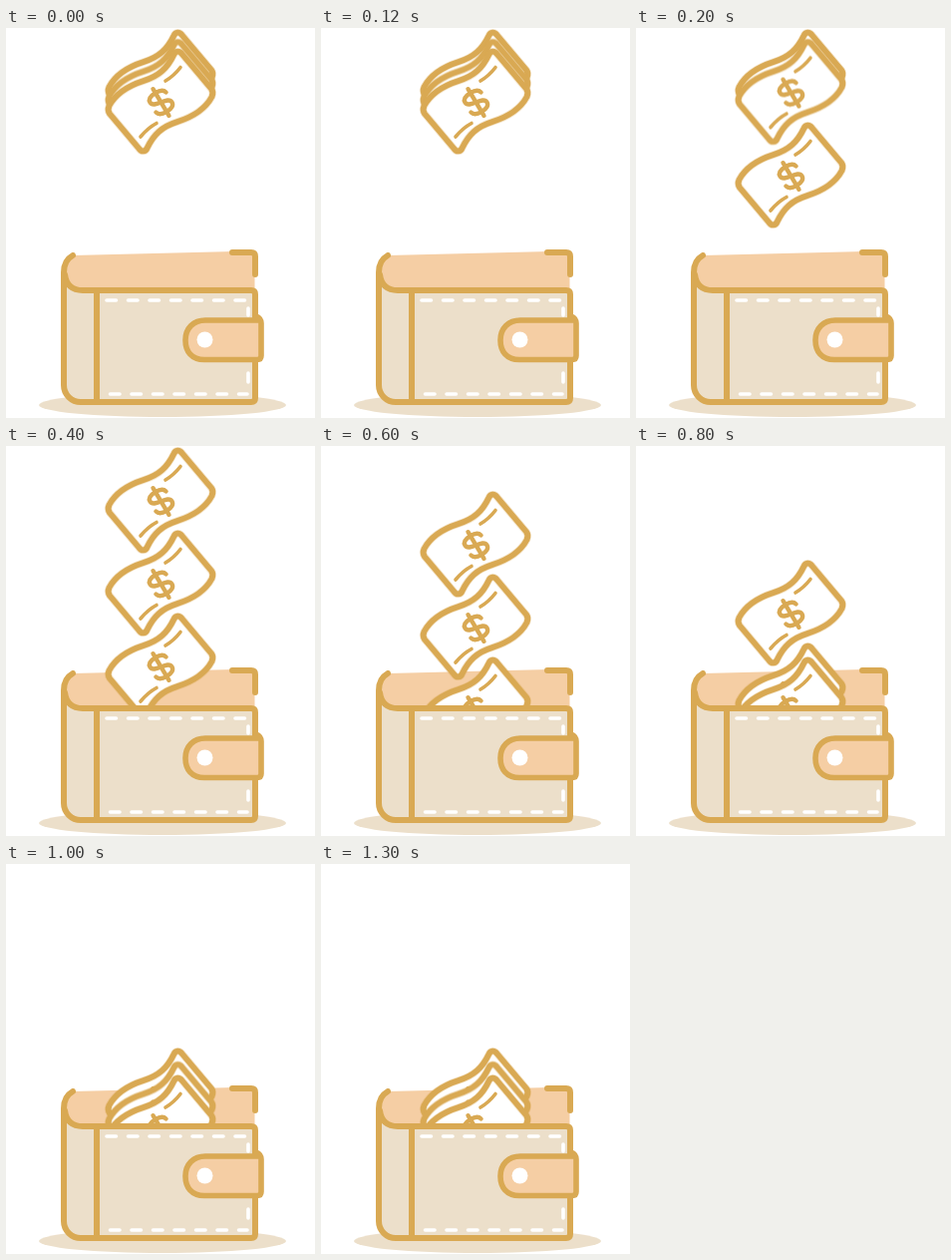
Recreate the animation shown at these times as an HTML page. Size 310x391 px, loop 1500 ms.

```html
<!DOCTYPE html>
<html lang="en">
<head>
<meta charset="utf-8">
<title>Wallet</title>
<style>
  html, body { margin: 0; width: 100%; height: 100%; overflow: hidden; background: #fff; }
  svg { display: block; width: 100vw; height: 100vh; }
  .line { fill: none; stroke: #d9a953; stroke-width: 6; stroke-linecap: round; stroke-linejoin: round; }
  .thin { stroke-width: 3.6; }
  .sand { fill: #ecdfca; }
  .peach { fill: #f5cea4; }
  .clasp { fill: #f5cea4; stroke-width: 5.6; }
  .stitch { fill: none; stroke: #fff; stroke-width: 3.6; stroke-linecap: round; }
</style>
</head>
<body>
<svg viewBox="0 0 310 391">
  <defs>
    <path id="sheet" d="M168.500 7.500C170 4 174 3.500 176.500 7L206 42Q208.500 45.500 206.500 50C199 64 186 70.500 172 75C156 80 148 88 141.500 101.500C140 105 136 105.500 133.500 102L104 67Q101.500 63.500 103.500 59C111 45 124 38.500 138 34C154 29 162 21 168.500 7.500Z"/>
    <g id="note">
      <use href="#sheet" fill="#fff" stroke="#d9a953" stroke-opacity=".3" stroke-width="7.4"/>
      <use href="#sheet" class="line" style="stroke-width:5.8"/>
      <path class="line thin" d="M160 34Q168.500 29 175 20.500M151 76.500Q142.500 81 135 90"/>
      <path class="line" style="stroke-width:4.4" transform="translate(155.500 55.500) rotate(-31)"
        d="M9.500-6C8.500-10 4-11 0-11C-6-11-9.500-9-9.500-5.500C-9.500-1.500-5-.8 0 0C5 .8 9.500 1.800 9.500 5.500C9.500 9 6 11 0 11C-4 11-8.500 10-9.500 6M0-15.500V15.500"/>
    </g>
  </defs>

  <ellipse class="sand" cx="157" cy="378" rx="124" ry="12"/>
  <path class="peach" d="M67 228L249.500 223.500V263H76Q58 263 59 243Q60 233 67 228Z"/>
  <path class="line" d="M227 225H246Q250 225 250 229V247"/>

  <g id="notes"></g>

  <path class="sand" d="M58 245Q61 263 77 263H246Q250 263 250 267V371Q250 375 246 375H75A17 17 0 0 1 58 358Z"/>
  <g class="stitch">
    <path stroke-dasharray="9.500 12" d="M101 273H243"/>
    <path stroke-dasharray="9.500 12" d="M104.500 367H242"/>
    <path d="M243 281V288M243 346V355"/>
  </g>
  <path class="line" d="M67 228Q58 233 58 245V358A17 17 0 0 0 75 375H246Q250 375 250 371V267Q250 263 246 263H77Q61 263 59 247M91 264V374"/>
  <path class="line clasp" d="M251 289Q256 291 256 296V328.500Q256 332.500 252 332.500H199C186 332.500 180 324 180 313C180 301 188 293 200 293H255"/>
  <circle cx="199.500" cy="312.500" r="8" fill="#fff"/>
</svg>
<script>
  const LOOP = 1500, STEP = 200;
  // Drop of each note at every step, back note first
  const drops = [
    [0, 0, 0, 44, 113, 183],
    [9.5, 9.5, 83, 127, 196, 196.5],
    [19, 93, 166, 210, 210, 210]
  ];
  const layer = document.getElementById('notes');

  for (const ys of drops) {
    const note = document.createElementNS('http://www.w3.org/2000/svg', 'use');
    note.setAttribute('href', '#note');
    layer.append(note);
    const frames = [...ys, ys.at(-1)].map((y, i) => ({
      transform: `translateY(${y}px)`,
      offset: i < ys.length ? i * STEP / LOOP : 1,
      easing: 'steps(1, end)'
    }));
    note.animate(frames, { duration: LOOP, iterations: Infinity }).startTime = 0;
  }
</script>
</body>
</html>
```
